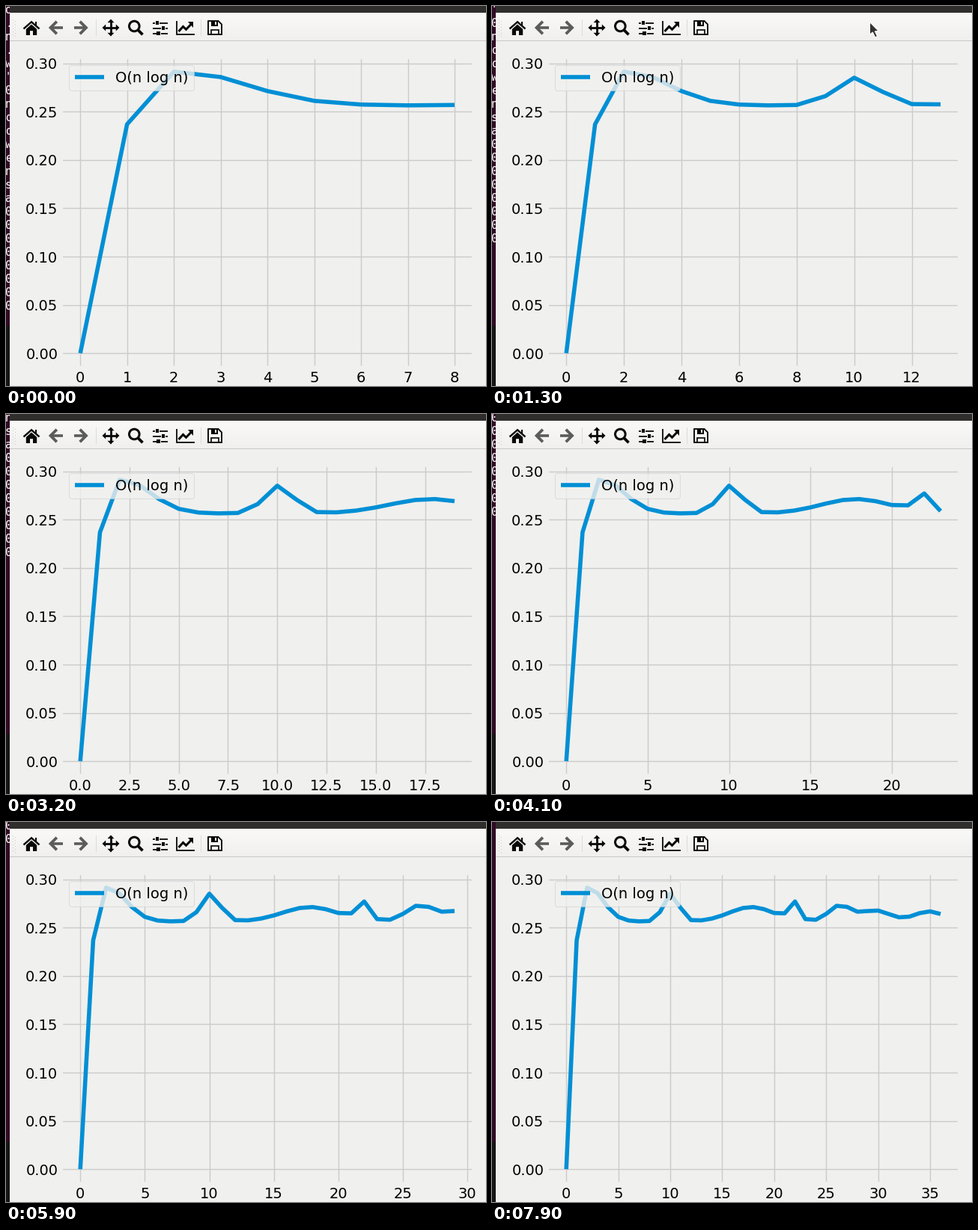
Recreate the animation shown at these times as a matplotlib script. Size 641x508 px, loop 8000 ms.

```python
import matplotlib.pyplot as plt
import numpy as np
from matplotlib.animation import FuncAnimation
from matplotlib.patches import Circle, Polygon, Rectangle

W, H, DPI = 641, 508, 100
FRAMES, STEP_MS = 80, 100
PERIOD = 280              # ms between two samples
ROW = 18                  # terminal line height
PT = 72 / DPI             # points per pixel
BG, INK, GREY = "#f0f0ee", "#080808", "#5b5b5a"

plt.rcParams.update({
    "font.family": "DejaVu Sans", "font.size": 14,
    "axes.facecolor": "none", "axes.edgecolor": BG, "axes.linewidth": 3,
    "axes.grid": True, "axes.axisbelow": True,
    "grid.color": "#cbcbcb", "grid.linestyle": "-", "grid.linewidth": 1,
    "xtick.major.size": 0, "ytick.major.size": 0,
    "lines.linewidth": 4, "lines.solid_capstyle": "butt",
    "patch.linewidth": 0.5, "legend.fontsize": 14,
    "toolbar": "None",
})

FIRST = 8                 # last sample shown at the start
PEAK = 0.2915
# swells of the curve: centre, height, width
SWELLS = [(2, 0.037, 2.1), (10.1, 0.029, 1.05), (17.8, 0.015, 3),
          (21.9, 0.019, 0.7), (26.3, 0.0165, 1.5), (29.7, 0.0115, 2),
          (34.9, 0.0105, 2)]
PRINTED = "o.n.w\"0nddwensa" + "0" * 8


def ratio(n):
    """Steep start, then a steady level with a few swells."""
    level = 0.2565 + sum(h * np.exp(-((n - c) / w) ** 2) for c, h, w in SWELLS)
    return level * (1 - np.exp(-1.765 * n ** 1.5))


fig = plt.figure(figsize=(W / DPI, H / DPI), dpi=DPI, facecolor=BG)
ui = fig.add_axes([0, 0, 1, 1], zorder=0)


def box(x0, y0, x1, y1, color=INK, z=3):
    ui.add_patch(Rectangle((x0, y0), x1 - x0, y1 - y0, fc=color, lw=0, zorder=z))


def poly(points, color=INK):
    ui.add_patch(Polygon(points, closed=True, fc=color, lw=0, zorder=4))


def stroke(points, width, color=INK):
    xs, ys = zip(*points)
    ui.plot(xs, ys, color=color, lw=width * PT, solid_joinstyle="miter", zorder=4)


def draw_window():
    box(0, 0, 5, 428, "#300a24", 0)
    box(0, 428, 5, H, "#161515", 0)
    box(5, 0, W, 9, "#302e2c")
    box(5, 46, W, H, BG)
    shade = np.linspace([0.978, 0.976, 0.972], [0.942, 0.940, 0.934], 37)
    ui.imshow(shade[:, None, :], extent=(5, W, 46, 9), aspect="auto", zorder=3)
    box(5, 45.5, W, 46.5, "#c9c8c5")
    for x in (120, 260):
        box(x, 18, x + 1, 40, "#dcdbd8")
    for y in range(18, 40, 4):
        box(9, y, 10, y + 1, "#cac9c6")
        box(12, y + 2, 13, y + 3, "#cac9c6")


def draw_home(cx=34):
    stroke([(cx - 10.5, 30.5), (cx, 21.3), (cx + 10.5, 30.5)], 2.4)
    box(cx + 4.6, 21, cx + 7.4, 27)
    for side in (-1, 1):
        poly([(cx, 24.6), (cx + 7.2 * side, 31), (cx + 7.2 * side, 39),
              (cx + 2 * side, 39), (cx + 2 * side, 33.2), (cx, 33.2)])


def draw_arrow(tip, way):
    stroke([(tip + 2 * way, 29), (tip + 18.5 * way, 29)], 3.6, GREY)
    stroke([(tip + (2 + abs(d)) * way, 29 + d) for d in (-8.3, 0, 8.3)], 3.8, GREY)


def draw_move(cx=140, cy=29):
    for dx, dy in ((1, 0), (-1, 0), (0, 1), (0, -1)):
        stroke([(cx, cy), (cx + 8 * dx, cy + 8 * dy)], 2.8)
        base = (cx + 6.8 * dx, cy + 6.8 * dy)
        poly([(cx + 11.5 * dx, cy + 11.5 * dy),
              (base[0] + 4.5 * dy, base[1] + 4.5 * dx),
              (base[0] - 4.5 * dy, base[1] - 4.5 * dx)])


def draw_zoom():
    ui.add_patch(Circle((171.3, 27), 6.8, fill=False, ec=INK, lw=3 * PT, zorder=4))
    stroke([(176, 31.8), (182.5, 38.3)], 3.8)


def draw_sliders():
    for y, knob in ((22.5, 202), (29.5, 210), (36.5, 203.5)):
        stroke([(196, y), (216, y)], 1.8)
        box(knob - 3, y - 2.5, knob + 3, y + 2.5, "#f5f5f3", 5)
        box(knob - 2.4, y - 2.5, knob + 2.4, y + 2.5, z=6)


def draw_chart():
    stroke([(228, 19.5), (228, 38), (252, 38)], 1.8)
    stroke([(230.5, 34), (236.5, 27.5), (240.5, 31.3), (247.5, 24)], 3)
    poly([(242.8, 21), (250.3, 21), (250.3, 28.5)])


def draw_disk():
    stroke([(270, 20), (283.5, 20), (288, 24.5), (288, 38), (270, 38), (270, 19.2)], 1.9)
    box(273.5, 20, 282.5, 26.5)
    box(278.5, 21, 281, 25, "#f5f5f3", 5)
    stroke([(274, 38), (274, 31.5), (284, 31.5), (284, 38)], 1.7)


draw_window()
draw_home()
draw_arrow(57.5, 1)
draw_arrow(109, -1)
draw_move()
draw_zoom()
draw_sliders()
draw_chart()
draw_disk()

POINTER = 1.2 * np.array([(0, 0), (0, 14), (3.2, 11.2), (6, 17), (8.4, 15.8),
                          (5.7, 10.3), (9.8, 10)])
cursor = Polygon(POINTER, closed=True, fc="#33312f", ec="#fbfbfa",
                 lw=1.1 * PT, zorder=9)
ui.add_patch(cursor)
rows = [ui.text(-1, 0, char, family="DejaVu Sans Mono", size=15 * PT,
                color="white", va="baseline", zorder=1, clip_on=True)
        for char in PRINTED]
ui.set(xlim=(0, W), ylim=(H, 0))
ui.axis("off")

# plot area in pixels from the top left corner
LEFT, RIGHT, TOP, BOTTOM = 74.2, 624, 69, 482.95
ax = fig.add_axes([LEFT / W, 1 - BOTTOM / H, (RIGHT - LEFT) / W, (BOTTOM - TOP) / H],
                  zorder=1)
line, = ax.plot([], [], color="#008fd5", label="O(n log n)")
ax.set_ylim(-0.05 * PEAK, 1.05 * PEAK)
ax.legend(loc="upper left", facecolor=BG)


def place_cursor(ms):
    cursor.set_visible(1000 <= ms <= 2800)
    u = np.clip((ms - 1300) / 1100, 0, 1)
    x = 504.5 - 69 * u * u * (3 - 2 * u)
    cursor.set_xy(POINTER + (x, 21.5))


def update(frame):
    ms = frame * STEP_MS
    last = FIRST + int(ms / PERIOD + 0.4)
    n = np.arange(last + 1)
    line.set_data(n, ratio(n))
    ax.set_xlim(-0.05 * last, 1.05 * last)

    scrolled = int(ms / PERIOD + 0.64)
    for i, row in enumerate(rows):
        row.set_y(9.5 + ROW * (i - scrolled))
    place_cursor(ms)
    return [line, cursor, *rows]


anim = FuncAnimation(fig, update, frames=FRAMES, interval=STEP_MS,
                     init_func=lambda: update(0), repeat=True, repeat_delay=0)
plt.show()
```
